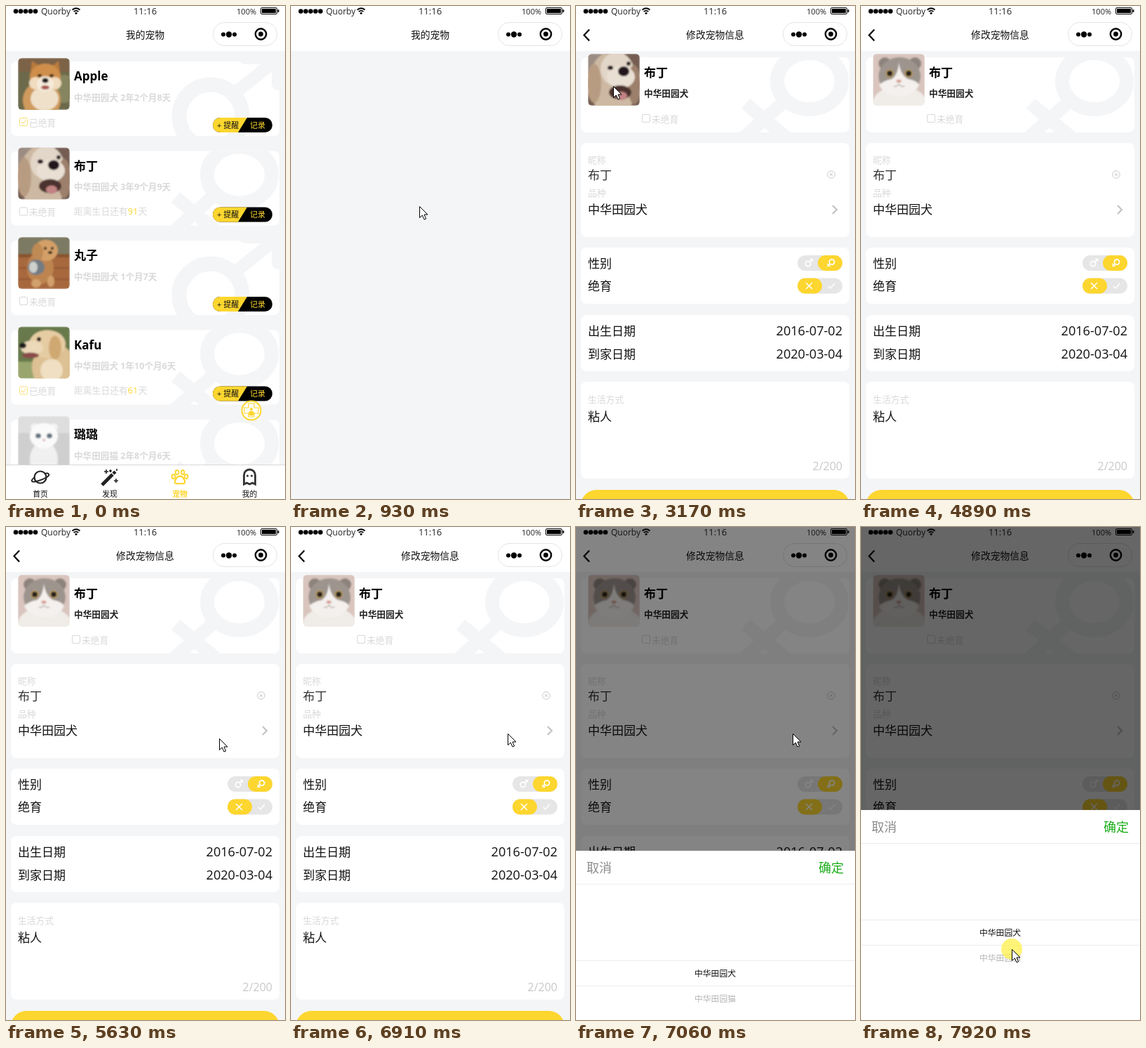
Animation of 398 by 702 pixels, one loop 8 s. Source, as an HTML page:

```html
<!DOCTYPE html>
<html lang="zh">
<head>
<meta charset="utf-8">
<style>
html, body { margin: 0; width: 100%; height: 100%; overflow: hidden; background: #f4f5f7 }
svg { display: block; width: 398px; height: 702px; font-family: "Open Sans", "Noto Sans CJK SC", "Noto Sans CJK", sans-serif }
</style>
</head>
<body>
<svg id="stage" viewBox="0 0 398 702"></svg>
<script>
const YELLOW = '#fdd62f', PALE = '#d9d9d9', BG = '#f4f5f7', INK = '#111', W = '#fff';

// Shape helpers; text is placed by its vertical middle.
const rect = (x, y, w, h, fill, r = 0, more = '') =>
  `<rect x="${x}" y="${y}" width="${w}" height="${h}" rx="${r}" fill="${fill}" ${more}/>`;
const oval = (x, y, rx, ry, fill, more = '') =>
  `<ellipse cx="${x}" cy="${y}" rx="${rx}" ry="${ry}" fill="${fill}" ${more}/>`;
const dot = (x, y, r, fill, more) => oval(x, y, r, r, fill, more);
const ring = (x, y, r, color, w) => dot(x, y, r, 'none', `stroke="${color}" stroke-width="${w}"`);
const line = (d, color, w, more = '') =>
  `<path d="${d}" fill="none" stroke="${color}" stroke-width="${w}" ${more}/>`;
const fill = (d, color) => `<path d="${d}" fill="${color}"/>`;
const text = (x, y, size, str, color = INK, more = '') =>
  `<text x="${x}" y="${y + size * .375}" font-size="${size}" fill="${color}" ${more}>${str}</text>`;
const group = (body, more = '') => `<g ${more}>${body}</g>`;
const at = (x, y, body, more = '') => group(body, `transform="translate(${x} ${y})" ${more}`);
const BOLD = 'font-weight="700"', MID = 'text-anchor="middle"', END = 'text-anchor="end"';

// Pet portraits on a 74 x 74 tile
const portraits = {
  shiba: rect(0, 0, 74, 74, '#6d6a4c') + rect(0, 0, 74, 20, '#7b6247') + oval(66, 44, 14, 20, '#86855f') +
    oval(34, 60, 27, 27, '#cf9a5d') + fill('M17 30L20 4L33 13H47L58 4L61 30Z', '#b97a3d') +
    oval(39, 28, 22, 20, '#cf8f4c') + oval(38, 58, 20, 17, '#efe0c9') +
    oval(25, 36, 9, 9, '#f0dcc0') + oval(53, 36, 9, 9, '#f0dcc0') + oval(39, 37, 12, 11, '#f6ebda') +
    oval(31, 25, 3, 2, '#2b2019') + oval(48, 25, 3, 2, '#2b2019') + oval(39, 32, 4.5, 3.5, '#221d1c') +
    oval(39, 42, 6, 3, '#a95750'),
  retriever: rect(0, 0, 74, 74, '#745d52') + rect(0, 0, 30, 26, '#9b8d83') +
    oval(36, 42, 35, 46, '#cdb9a3') + oval(41, 22, 23, 24, '#e2d6c8') + oval(9, 42, 10, 28, '#b89c82') +
    oval(66, 44, 9, 28, '#9d806c') + oval(47, 33, 20, 16, '#e9dfd3') + oval(46, 55, 16, 10, '#4b322d') +
    oval(48, 60, 8, 6, '#c18383') + oval(51, 25, 8, 7, '#20191b') +
    oval(32, 20, 4, 3, '#281e1b') + oval(58, 14, 3, 3, '#281e1b'),
  poodle: rect(0, 0, 74, 74, '#a7683d') + rect(0, 0, 74, 24, '#7d7a63') + rect(0, 24, 74, 5, '#87552f') +
    line('M0 44H74M0 60H74', '#8c522e', 1.5) + oval(32, 44, 19, 23, '#bd8450') + oval(40, 19, 17, 15, '#d4a067') +
    oval(28, 22, 8, 13, '#c08a55') + oval(26, 43, 12, 11, '#737b82') + oval(22, 43, 6, 8, '#cdd0cd') +
    oval(26, 66, 7, 6, '#d2a06c') + oval(47, 63, 5, 8, '#d2a06c') +
    dot(39, 16, 2, '#281a13') + dot(49, 16, 2, '#281a13') + oval(46, 22, 3, 2, '#281a13'),
  golden: rect(0, 0, 74, 74, '#67794c') + rect(0, 50, 34, 24, '#9aa56d') +
    oval(51, 58, 31, 34, '#ddc093') + oval(42, 25, 26, 20, '#e6cca3') + oval(53, 30, 9, 17, '#d0a872') +
    oval(20, 30, 16, 10, '#ecd9ba') + oval(18, 41, 12, 4, '#884c48') + oval(7, 27, 5, 4, '#1f1b1a') +
    dot(30, 18, 3, '#2a211b') + oval(48, 62, 16, 16, '#f0dfc2'),
  kitten: rect(0, 0, 74, 74, '#cfcfd0') + rect(0, 0, 74, 24, '#dedede') +
    oval(37, 62, 20, 26, '#f0f0f0') + oval(24, 16, 6, 6, '#f3f2f1') + oval(51, 16, 6, 6, '#f3f2f1') +
    oval(37, 28, 20, 18, '#fafafa') + oval(29, 28, 4, 3.5, '#657580') + oval(45, 28, 4, 3.5, '#657580') +
    oval(37, 34, 2, 1.5, '#cfa8a5'),
  tabby: rect(0, 0, 74, 74, '#d9c5bd') + oval(38, 70, 38, 24, '#f0ece8') +
    oval(17, 14, 9, 9, '#8d837d') + oval(60, 14, 9, 9, '#8d837d') + oval(38, 32, 30, 27, '#9d948e') +
    fill('M37 12Q39 30 50 36Q62 38 66 44Q58 62 38 61Q16 61 9 44Q18 37 27 36Q36 30 37 12Z', '#f4f0ed') +
    dot(24, 28, 6, '#b89a62') + dot(51, 28, 6, '#b89a62') + dot(24, 28, 4, '#25231f') + dot(51, 28, 4, '#25231f') +
    oval(37, 39, 3.5, 2.2, '#d59b91') + line('M30 46Q34 48 37 43Q40 48 45 46', '#8c7f79', 1)
};
const photo = (x, y, name, id = 'photo-' + name) =>
  at(x, y, group(group(portraits[name], 'filter="url(#soft)"'), 'clip-path="url(#tile)"'), `id="${id}"`);

// Watermarks, relative to the card's corner
const male = ring(285, 78, 45, BG, 21) + line('M318 46L381 -4M334 -5H381V32', BG, 18, 'stroke-linecap="round"');
const female = oval(326, 34, 46, 40, 'none', `stroke="${BG}" stroke-width="20"`) +
  line('M291 62L226 120M235 66L300 120', BG, 19);
const card = (y, h, mark = '') => at(7, y, rect(0, 0, 383, h, W, 8) + group(mark, 'clip-path="url(#card)"'));
const checkbox = (x, y, on) =>
  rect(x + .5, y + .5, 11, 11, 'none', 1.5, `stroke="${on ? '#fbe07a' : PALE}"`) +
  (on ? line(`M${x + 3} ${y + 6}l2.5 2.5l4-5`, '#fbe07a', 1.1) : '') +
  text(x + 14, y + 7, 12.8, on ? '已绝育' : '未绝育', PALE);

function petCard(i, name, breed, age, pic, isMale, fixed, days) {
  const y = 79 + i * 127.5;
  return card(y, 106, isMale ? male : female) + photo(17, y - 5, pic) +
    text(97, y + 21, 17, name, '#000', BOLD) +
    text(97, y + 51, 12.6, `中华田园${breed} ${age}`, PALE, BOLD) +
    checkbox(19, y + 80, fixed) +
    (days ? text(97, y + 86, 12.8, `距离生日还有<tspan fill="${YELLOW}">${days}</tspan>天`, PALE) : '') +
    at(295, y + 80, rect(0, 0, 85, 21, '#000', 10.5) +
      fill('M10.5 0H49L36 21H10.5A10.5 10.5 0 0 1 10.5 0Z', YELLOW) +
      text(6, 10.5, 11, '+ 提醒') + text(53, 10.5, 11, '记录', YELLOW));
}

const pad = (x, y) => oval(x, y, 2.4, 3, 'none', `stroke="${YELLOW}" stroke-width="1.8"`);
const paw = line('M-4 0Q0 -3 4 0L7 5Q8 10 3 9H-3Q-8 10-7 5Z', YELLOW, 2.2) +
  pad(-9, -1) + pad(-4, -7) + pad(4, -7) + pad(9, -1);
const planet = ring(0, 0, 8.5, '#222', 2.2) +
  line('M-8 0C-15 5-13 8-4 5.5S14-2 12-4.5S8-5 6-5', '#222', 2);
const wand = line('M-11 11L4-4', '#222', 5) + line('M5-5L8-8', '#222', 4.5) +
  line('M-5-11v6m-3-3h6M9 2v6m-3-3h6M1-11v4m-2-2h4M10-12v3', '#222', 1.6);
const ghost = line('M-8 10V-3A8 8 0 0 1 8-3V10L4 8L0 10L-4 8Z', '#333', 2.8) +
  dot(-3, -2, 1.6, '#333') + dot(3, -2, 1.6, '#333');
const tab = (x, icon, label, color = INK, more = '') =>
  at(x, 671, icon) + text(x, 695, 10.8, label, color, `${MID} ${more}`);

const listPage =
  petCard(0, 'Apple', '犬', '2年2个月8天', 'shiba', true, true) +
  petCard(1, '布丁', '犬', '3年9个月9天', 'retriever', false, false, 91) +
  petCard(2, '丸子', '犬', '1个月7天', 'poodle', true, false) +
  petCard(3, 'Kafu', '犬', '1年10个月6天', 'golden', false, true, 61) +
  petCard(4, '璐璐', '猫', '2年8个月6天', 'kitten', false, false) +
  at(350, 576, dot(0, 0, 14, W) + ring(0, 0, 13.5, YELLOW, 2) +
    line('M-4-10H4V-4H10V4H4V9H-4V4H-10V-4H-4Z', YELLOW, 1.2) + oval(0, 4, 4, 3.5, YELLOW) + dot(0, -2, 2, YELLOW)) +
  rect(0, 653, 398, 49, W) + rect(0, 653, 398, 1, '#d8d8d8') +
  tab(49, planet, '首页') + tab(148, wand, '发现') + tab(248, paw, '宠物', YELLOW, BOLD) + tab(347.5, ghost, '我的');

const toggle = (y, knob, icons) => rect(316, y, 64, 22, '#e6e6e6', 11) + rect(knob, y, 35, 22, YELLOW, 11) + icons;
const form =
  card(73, 107, female) + text(97, 95, 17, '布丁', '#000', BOLD) + text(97, 124, 12.7, '中华田园犬', '#222', BOLD) +
  checkbox(94, 154, false) +
  card(195, 134) + text(17, 219.5, 12.8, '昵称', PALE) + text(17, 241, 17, '布丁', '#333') +
  text(17, 266.5, 12.8, '品种', PALE) + text(17, 290, 17, '中华田园犬') +
  ring(364, 240, 5.3, '#ccc', 1) + line('M362 238l4 4m0-4l-4 4', '#ccc', 1) +
  line('M366 284l6 6l-6 6', '#c4c4c4', 2.2) +
  card(344, 80) + text(17, 367, 17, '性别') + text(17, 399, 17, '绝育') +
  toggle(355, 345, ring(331, 367, 3.6, W, 1.7) + line('M333.5 364.5l4-4m-3.5 0h3.5v3.5', W, 1.5) +
    ring(365, 364.5, 3.6, W, 1.8) + line('M362.5 367l-4 4m0-4l4 4', W, 1.6)) +
  toggle(387.5, 316, line('M328 394l9 9m0-9l-9 9', W, 1.5) + line('M360 399l3 3l6-7', W, 1.5)) +
  card(440, 80) + text(17, 463, 17, '出生日期') + text(380, 462, 18.1, '2016-07-02', INK, END) +
  text(17, 496, 17, '到家日期') + text(380, 495, 18.1, '2020-03-04', INK, END) +
  card(535, 138) + text(17, 560, 12.8, '生活方式', PALE) + text(17, 585, 17, '粘人') +
  text(380, 655, 16, '2/200', '#c8c8c8', END) +
  rect(7, 689, 383, 44, YELLOW, 22);

const topBar = rect(0, 0, 398, 64, W) +
  [14, 21, 28, 35, 42].map(x => dot(x, 7.5, 3.3, '#000')).join('') +
  text(50, 7, 12, 'Quorby', '#222') +
  line('M94.5 5.5Q100 1 105.5 5.5M96.7 8Q100 5.2 103.3 8', '#000', 1.7) + dot(100, 10.3, 1.5, '#000') +
  text(198.5, 7, 13, '11:16', '#222', MID) + text(357, 7.5, 11, '100%', '#222', END) +
  rect(363.5, 2.5, 23, 9, 'none', 1.5, 'stroke="#000"') + rect(365, 4, 20, 6, '#000') + rect(387.5, 5, 2, 4, '#000', 1) +
  rect(295.5, 23.5, 91, 33, W, 16.5, 'stroke="#e4e4e4"') +
  dot(310, 40.5, 3, '#000') + dot(318, 40.5, 4.2, '#000') + dot(326, 40.5, 3, '#000') +
  ring(363.5, 40, 7.7, '#000', 2.4) + dot(363.5, 40, 3.4, '#000');

const sheet = rect(0, 0, 398, 299, W) +
  text(15, 24.5, 18, '取消', '#8c8c8c') + text(382, 24.5, 18, '确定', '#1aad19', END) +
  [47, 156, 192].map(y => rect(0, y, 398, 1, '#ececec')).join('') +
  text(198.5, 174.5, 11.8, '中华田园犬', INK, MID) + text(198.5, 210.5, 11.8, '中华田园猫', '#b4b4b4', MID);

document.getElementById('stage').innerHTML =
  `<defs><clipPath id="tile">${rect(0, 0, 74, 74, W, 6)}</clipPath><clipPath id="card">${rect(0, 0, 383, 107, W, 8)}</clipPath>` +
  '<filter id="soft"><feGaussianBlur stdDeviation="1"/></filter></defs>' +
  rect(0, 0, 398, 702, BG) + group(listPage, 'id="list"') +
  group(rect(0, 64, 398, 638, BG), 'id="blank"') +
  group(form + photo(17, 68, 'retriever', 'before') + photo(17, 68, 'tabby', 'after'), 'id="form"') +
  topBar +
  group(text(198.5, 41, 13.8, '我的宠物', INK, MID), 'id="listTitle"') +
  group(text(198.5, 41, 13.8, '修改宠物信息', INK, MID) + line('M19 33.5L11.5 41.5L19 49.5', '#000', 2.2), 'id="formTitle"') +
  group(rect(288, 65, 110, 26, W, 0, 'opacity=".75"') + text(343, 77, 14.3, '375px × 603px', '#888', MID), 'id="size"') +
  group(rect(0, 0, 398, 702, '#000'), 'id="shade"') + group(sheet, 'id="sheet"') +
  group(dot(0, 0, 15, '#fff04a', 'id="press" opacity=".75"') +
    group(ring(15, 2, 6, '#3a9be0', 3), 'id="busy"') +
    '<path d="M.5 .5V16.5L4.3 13L7 19L9.6 18L7 12H12Z" fill="#fff" stroke="#000"/>', 'id="cursor"');

const el = id => document.getElementById(id);
const show = (id, on) => el(id).style.display = on ? '' : 'none';
const move = (id, x, y) => el(id).setAttribute('transform', `translate(${x} ${y})`);
const ramp = (t, from, to) => Math.min(1, Math.max(0, (t - from) / (to - from)));
const within = (t, spans) => spans.some(([a, b]) => t >= a && t < b);

// Pointer: time, x, y
const path = [
  [70, 266, 551], [290, 183, 285], [1240, 183, 285], [1460, 165, 268], [2000, 53, 114], [3869, 53, 114],
  [3870, 60, 112], [5099, 60, 112], [5100, 388, 270], [5630, 304, 301], [6679, 304, 301], [6680, 309, 294],
  [7200, 309, 294], [7600, 260, 573], [7900, 215, 601], [8000, 215, 601]
];
function pointer(t) {
  const i = Math.max(1, path.findIndex(k => k[0] > t));
  const [t0, x0, y0] = path[i - 1], [t1, x1, y1] = path[i], p = ramp(t, t0, t1);
  return [x0 + (x1 - x0) * p, y0 + (y1 - y0) * p];
}

function draw(now) {
  const t = now % 8000;
  show('list', t < 930);
  show('blank', t >= 790);
  move('blank', 398 * (1 - ramp(t, 790, 930)), 0);
  show('form', t >= 1240);
  show('listTitle', t < 1240);
  show('formTitle', t >= 1240);
  show('size', within(t, [[1300, 2000]]));
  show('before', within(t, [[1700, 4890]]));
  show('after', t >= 4890);

  const open = 1 - (1 - ramp(t, 6930, 7210)) ** 2.6;
  el('shade').style.opacity = .6 * open;
  move('sheet', 0, 702 - 299 * open);

  show('cursor', within(t, [[70, 3490], [3870, 3950], [5100, 8000]]));
  show('press', within(t, [[460, 520], [2160, 2230], [6340, 6430], [7920, 8000]]));
  show('busy', within(t, [[2230, 2620], [2860, 3170]]));
  move('cursor', ...pointer(t));
  requestAnimationFrame(() => draw(performance.now() - start));
}
const start = performance.now();
draw(0);
</script>
</body>
</html>
```
